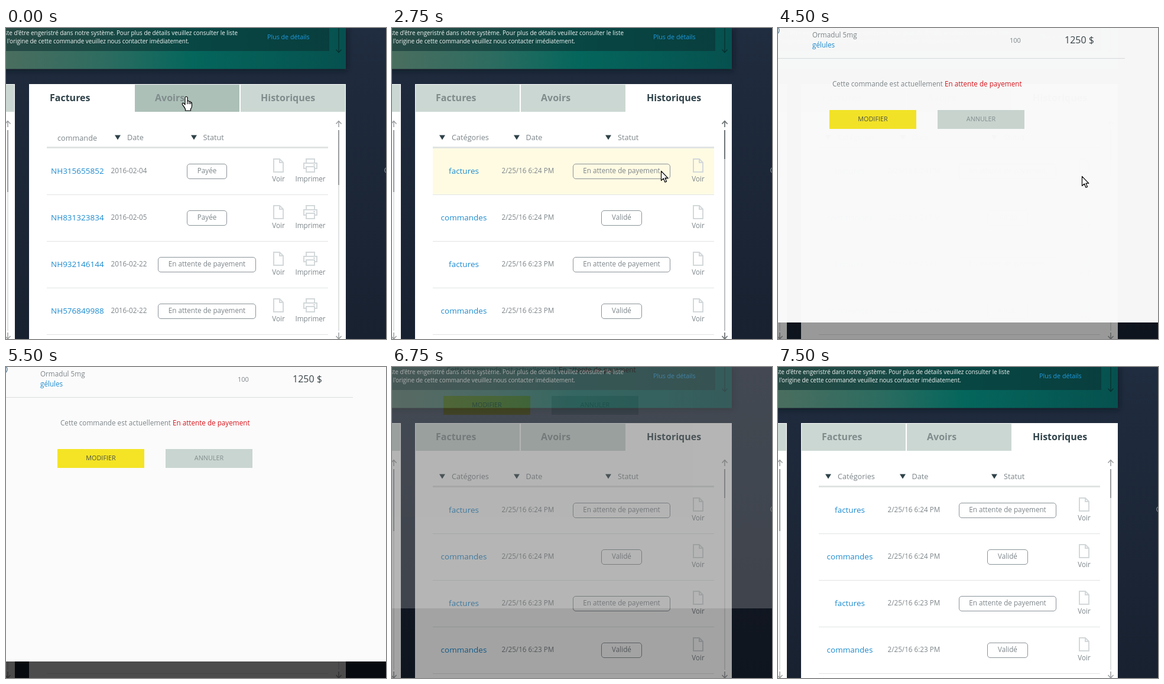
Animation of 643 by 527 pixels, one loop 8.25 s. Source, as an HTML page:

```html
<!DOCTYPE html>
<html lang="fr">
<head>
<meta charset="utf-8">
<title>Factures et historiques</title>
<style>
  html, body { margin: 0; width: 100%; height: 100%; overflow: hidden; background: #1c2635; }
  svg { display: block; width: 643px; height: 527px; }
  text { font-family: "Open Sans", "Noto Sans", sans-serif; fill: #7d8589; }
  .tab { font-size: 16px; font-weight: 700; }
  .head { font-size: 12.7px; }
  .cell { font-size: 11.7px; }
  .link { font-size: 13.5px; fill: #1b8bd0; }
  .note { font-size: 9.88px; fill: #f2f6f5; }
  .button { font-size: 10.8px; }
  .icon { fill: none; stroke: #d3d8da; stroke-width: 2; }
  .pill { fill: none; stroke: #8a9296; }
</style>
</head>
<body>
<svg id="stage" viewBox="0 0 643 527">
  <defs>
    <linearGradient id="night" x1="0" y1="0" x2="0" y2="1">
      <stop offset="0" stop-color="#202c3f"/>
      <stop offset="1" stop-color="#182130"/>
    </linearGradient>
    <linearGradient id="teal" x1="0" y1="0" x2="1" y2="0">
      <stop offset="0" stop-color="#4a6e5f"/>
      <stop offset=".3" stop-color="#2c6c60"/>
      <stop offset=".55" stop-color="#04665c"/>
      <stop offset="1" stop-color="#06514f"/>
    </linearGradient>
    <filter id="soft" x="-10%" y="-50%" width="120%" height="200%">
      <feGaussianBlur stdDeviation="4"/>
    </filter>
  </defs>
</svg>
<script>
const stage = document.getElementById('stage');
const LOOP = 8250;

const make = (tag, attrs = {}, parent = stage, content) => {
  const node = document.createElementNS('http://www.w3.org/2000/svg', tag);
  for (const key in attrs) node.setAttribute(key, attrs[key]);
  if (content !== undefined) node.textContent = content;
  parent.appendChild(node);
  return node;
};
const group = (parent = stage) => make('g', {}, parent);
const box = (parent, x, y, width, height, fill, more) =>
  make('rect', { x, y, width, height, fill, ...more }, parent);
const label = (parent, x, y, cls, content, anchor = 'start', more) =>
  make('text', { x, y, class: cls, 'text-anchor': anchor, ...more }, parent, content);
const path = (parent, d, more) => make('path', { d, ...more }, parent);
const mix = (a, b, k) => a.map((v, i) => Math.round(v + (b[i] - v) * k));
const rgb = c => `rgb(${c.join()})`;

function scrollbar(parent, x, thumbEnd, color) {
  const g = make('g', { stroke: color, fill: 'none' }, parent);
  path(g, `M${x} 173V513`, { opacity: .6 });
  path(g, `M${x} 173V${thumbEnd}`, { 'stroke-width': 2 });
  path(g, `M${x} 168V158M${x - 4.5} 162.5L${x} 157.5L${x + 4.5} 162.5` +
          `M${x} 516V527M${x - 4.5} 522L${x} 527L${x + 4.5} 522`, { 'stroke-width': 1.5 });
  return g;
}

function docIcon(parent, x, y) {
  return path(parent, `M${x - 8} ${y - 20}h10l6 6v16h-16zM${x + 2} ${y - 20}v6h6`, { class: 'icon' });
}

function printerIcon(parent, x, y) {
  path(parent, `M${x - 7} ${y - 12}v-8h14v8M${x - 7} ${y - 4}h-4v-9h22v9h-4` +
               `M${x - 7} ${y - 7}h14v9h-14zM${x + 5} ${y - 10}h3`, { class: 'icon' });
}

function pill(parent, cx, y, width, content) {
  box(parent, cx - width / 2, y - 11.5, width, 25, 'none', { rx: 4.5, class: 'pill' });
  label(parent, cx, y + 4, 'cell', content, 'middle');
}

function heading(parent, arrowX, textX, content) {
  path(parent, `M${arrowX - 5} 181.5h10l-5 8z`, { fill: '#2f4249' });
  label(parent, textX, 190, 'head', content);
}

// Backdrop of the page and the message banner
box(stage, 0, 0, 643, 527, 'url(#night)');
box(stage, -20, 0, 597, 72, '#0b121c', { filter: 'url(#soft)', opacity: .7 });
box(stage, 0, 0, 575, 69.5, 'url(#teal)');
box(stage, 0, 0, 547, 39, '#0b2f31', { opacity: .55 });
label(stage, 392, 12, 'note', "uste d'être engeristré dans notre système. Pour plus de détails veuillez consulter le liste", 'end');
label(stage, 310, 26, 'note', "l'origine de cette commande veuillez nous contacter imédiatement.", 'end');
label(stage, 442, 19, '', 'Plus de détails', 'start', { style: 'font-size:10.7px;fill:#1f9be0' });
path(stage, 'M563 0V41M558.5 36.5L563 41.5L567.5 36.5', { fill: 'none', stroke: '#08302f', 'stroke-width': 1.3 });
make('circle', { cx: 645, cy: 241, r: 4.3, fill: 'none', stroke: '#7d8791', 'stroke-width': 1.3 });

// Neighbouring panel and main panel
box(stage, 0, 95, 15, 432, '#fff');
box(stage, 0, 96, 14, 46, '#cbd7d2');
scrollbar(stage, 3, 278, '#9a9d9f');
box(stage, 39, 95, 536, 432, '#fff');

const tabs = [['Factures', 40, 74, 176], ['Avoirs', 218, 252, 177], ['Historiques', 397, 431, 177]]
  .map(([name, x, textX, width]) => ({
    back: box(stage, x, 96, width, 46, '#cbd7d2'),
    text: label(stage, textX, 124, 'tab', name)
  }));

const rowGlow = box(stage, 69, 204, 476, 78, '#fffbe3');
const linkGlow = box(stage, 497, 208, 48, 74, '#e6ebdc');
box(stage, 69, 201, 476, 3, '#e0e4e3');
for (let i = 1; i <= 4; i++) box(stage, 69, 203 + 79 * i, 476, 1, '#e1e4e4');

const views = [group(), group()];

const [bills, history] = views;
label(bills, 87, 191, 'head', 'commande');
heading(bills, 189, 205, 'Date');
heading(bills, 318, 333.5, 'Statut');
scrollbar(bills, 563, 266, '#9a9d9f');
[['NH315655852', '04'], ['NH831323834', '05'], ['NH932146144', '22'], ['NH576849988', '22']]
  .forEach(([code, day], i) => {
    const y = 242 + 79 * i;
    label(bills, 76, y + 5, 'link', code);
    label(bills, 177.5, y + 4, 'cell', '2016-02-' + day);
    if (i < 2) pill(bills, 340, y, 67, 'Payée');
    else pill(bills, 340, y, 165, 'En attente de payement');
    docIcon(bills, 461, y);
    printerIcon(bills, 515, y);
    label(bills, 461, y + 18, 'cell', 'Voir', 'middle');
    label(bills, 515, y + 18, 'cell', 'Imprimer', 'middle');
  });

heading(history, 85, 101, 'Catégories');
heading(history, 211, 226.5, 'Date');
heading(history, 366, 382, 'Statut');
scrollbar(history, 563, 222, '#9a9d9f');
const darkBar = scrollbar(history, 563, 222, '#6d7376');
for (let i = 0; i < 4; i++) {
  const y = 242 + 79 * i, bill = i % 2 === 0;
  label(history, 121.5, y + 5, 'link', bill ? 'factures' : 'commandes', 'middle');
  label(history, 185.5, y + 4, 'cell', `2/25/16 6:2${i < 2 ? 4 : 3} PM`);
  if (bill) pill(history, 388.5, y, 164, 'En attente de payement');
  else pill(history, 388.5, y, 68, 'Validé');
  docIcon(history, 518, y);
  label(history, 518, y + 18, 'cell', 'Voir', 'middle');
}

// Order dialog
const shade = box(stage, 0, 0, 643, 527, '#000');
const dialog = group();
box(dialog, 0, -20, 643, 519, '#fbfbfb');
make('circle', { cx: -5, cy: 4, r: 7, fill: 'none', stroke: '#5f7f96', 'stroke-width': 1.4 }, dialog);
label(dialog, 58, 16, 'cell', 'Ormadul 5mg');
label(dialog, 58, 33, 'cell', 'gélules', 'start', { style: 'fill:#1b8bd0' });
label(dialog, 392, 25, '', '100', 'start', { style: 'font-size:11px' });
label(dialog, 485, 26, '', '1250 $', 'start', { style: 'font-size:16px;fill:#3a454a' });
box(dialog, 0, 51, 587, 1, '#dadddd');
const status = label(dialog, 92, 99, 'cell', 'Cette commande est actuellement ');
make('tspan', { fill: '#d8141c' }, status, 'En attente de payement');
box(dialog, 87, 139, 147, 32, '#f4e425');
box(dialog, 270, 139, 147, 32, '#c9d5d0');
label(dialog, 160.5, 158, 'button', 'MODIFIER', 'middle', { style: 'fill:#4b5145' });
label(dialog, 343.5, 158, 'button', 'ANNULER', 'middle', { style: 'fill:#828e8e' });

// Pointers, drawn from their hot spot
const ink = { fill: '#fff', stroke: '#000', 'stroke-width': 1.2, 'stroke-linejoin': 'round' };
const pointers = {
  hand: path(stage, 'M-2 1.5Q0 -1 2 1.5V8Q4 6.5 5 9Q7 7.5 7.5 10Q9.5 9.5 9.5 12V16Q9.5 19 7.5 21V24H-1.5V21.5' +
    'Q-3 18 -6 14.5Q-7.5 12 -6 11.2Q-4 10.8 -2 14ZM2 8V13M5 9V13M7.5 10V13', ink),
  arrow: path(stage, 'M.5 .5V16.5L4.3 13L7 19.3L9.6 18.2L7 12.2H11.8Z', ink)
};

// Each step changes only the listed values
const steps = [
  [0, { pointer: ['hand', 305, 116], hover: [0, 1, 0], active: [1, 0, 0], view: 0,
        row: 0, link: 0, bar: 0, shade: 0, dialog: 0, dy: 0 }],
  [250, { pointer: ['hand', 333, 116] }],
  [500, { pointer: ['hand', 375, 116] }],
  [750, { pointer: ['hand', 450, 117], hover: [0, .5, .5] }],
  [1000, { pointer: ['hand', 479, 116], hover: [0, 0, 1] }],
  [1250, { pointer: ['hand', 476, 116] }],
  [1500, { view: 1, active: [.5, 0, .5] }],
  [1750, { active: [0, 0, 1] }],
  [2250, { pointer: ['hand', 468, 133] }],
  [2500, { pointer: ['arrow', 462, 222], row: 1, bar: .5 }],
  [2750, { pointer: ['arrow', 455, 242], bar: 1 }],
  [3000, { pointer: ['arrow', 453, 243] }],
  [3250, { pointer: ['hand', 514, 252], link: .5 }],
  [3500, { link: 1 }],
  [4000, { pointer: ['arrow', 514, 251], row: 0, link: 0, bar: 0, shade: .1 }],
  [4250, { shade: .25, dialog: .55, dy: -54 }],
  [4500, { shade: .4, dialog: .98, dy: 0 }],
  [4750, { shade: .6, dialog: 1 }],
  [5000, { shade: .7 }],
  [5500, { pointer: null }],
  [6500, { shade: .62, dialog: .69, dy: -36 }],
  [6750, { shade: .36, dialog: .2, dy: -90 }],
  [7000, { shade: .11, dialog: 0 }],
  [7250, { shade: .03 }],
  [7500, { shade: 0 }]
];

const IDLE = [203, 215, 210], HOVER = [172, 192, 184], WHITE = [255, 255, 255];
const GREY = [128, 140, 140], DARK = [47, 66, 73];

function draw(time) {
  const s = {};
  for (const [at, change] of steps) if (at <= time) Object.assign(s, change);
  tabs.forEach((tab, i) => {
    tab.back.setAttribute('fill', rgb(mix(mix(IDLE, HOVER, s.hover[i]), WHITE, s.active[i])));
    tab.text.style.fill = rgb(mix(GREY, DARK, s.active[i]));
  });
  views.forEach((view, i) => { view.style.display = i === s.view ? '' : 'none'; });
  rowGlow.style.opacity = s.row;
  linkGlow.style.opacity = s.link;
  darkBar.style.opacity = s.bar;
  shade.style.opacity = s.shade;
  dialog.style.opacity = s.dialog;
  dialog.setAttribute('transform', `translate(0 ${s.dy})`);
  for (const kind in pointers) {
    const shown = s.pointer && s.pointer[0] === kind;
    pointers[kind].style.display = shown ? '' : 'none';
    if (shown) pointers[kind].setAttribute('transform', `translate(${s.pointer[1]} ${s.pointer[2]})`);
  }
}

const start = performance.now();
function tick() {
  draw((performance.now() - start) % LOOP);
  requestAnimationFrame(tick);
}
tick();
</script>
</body>
</html>
```
